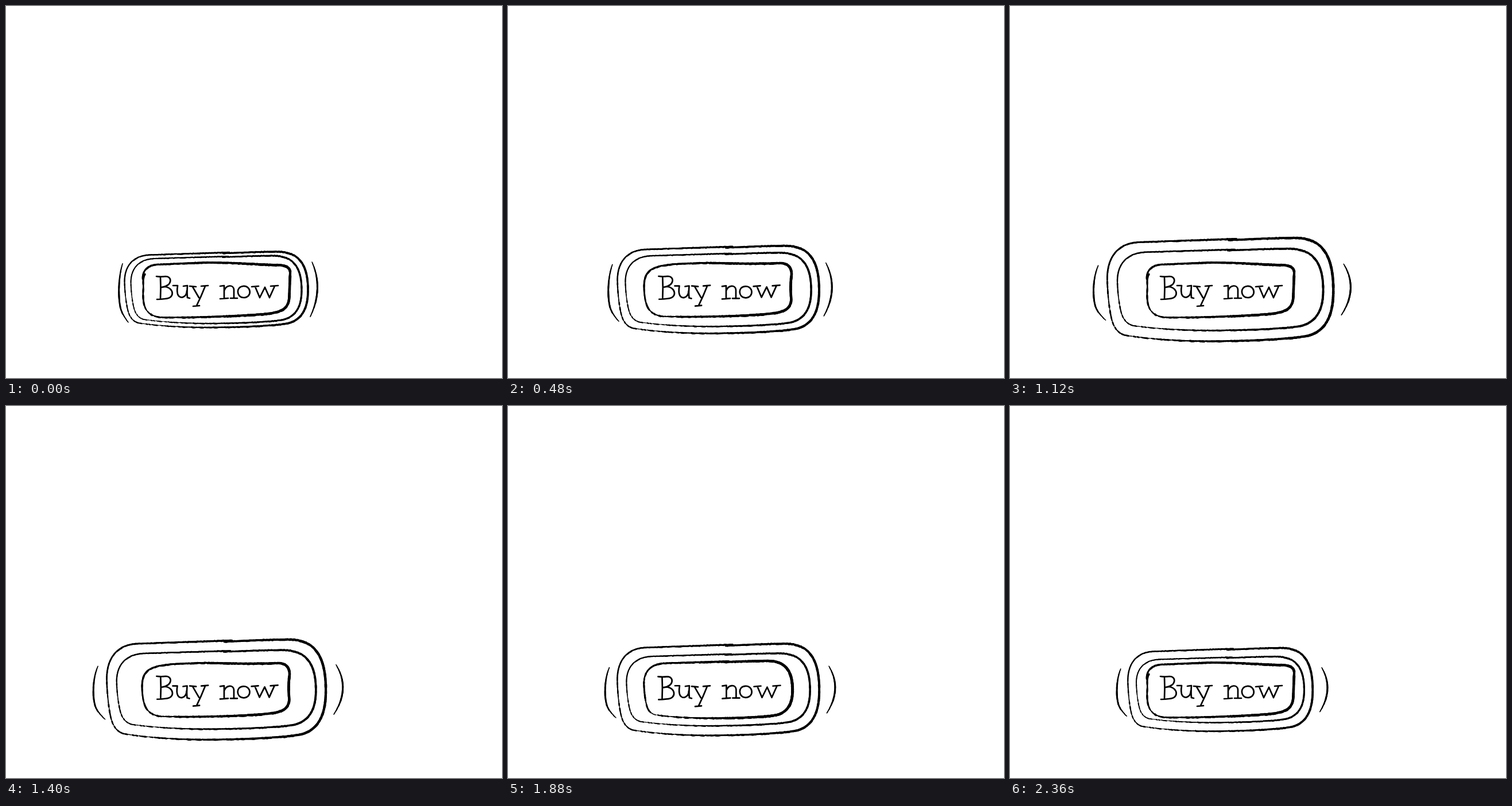
An HTML page with a canvas for the animation above (2400 ms loop, 864x648 px).

```html
<!DOCTYPE html>
<html lang="en">
<head>
<meta charset="utf-8">
<title>Buy now</title>
<style>
  html, body { margin: 0; height: 100%; overflow: hidden; background: #fff; }
  canvas { display: block; }
</style>
</head>
<body>
<canvas id="stage" width="864" height="648" role="img" aria-label="Buy now"></canvas>
<script>
const ctx = document.getElementById('stage').getContext('2d');
const LOOP = 2400, STEP = 40, PEAK = 1160;
const CX = 366, CY = 494, HALF_W = 160, HALF_H = 66;

const noise = n => { const s = Math.sin(n * 127.1) * 43758.5453; return s - Math.floor(s); };
const mix = (a, b, k) => a + (b - a) * k;

// Linear from start to peak, then linear to the end of the loop
const ramp = (t, start, peak, end) => t < PEAK
  ? mix(start, peak, t / PEAK)
  : mix(peak, end, (t - PEAK) / (LOOP - PEAK));

// Evenly spaced points along an SVG path
function sample(d) {
  const path = document.createElementNS('http://www.w3.org/2000/svg', 'path');
  path.setAttribute('d', d);
  const length = path.getTotalLength(), count = Math.ceil(length / 2.5);
  return Array.from({ length: count + 1 }, (_, i) => path.getPointAtLength(length * i / count));
}

const ring = sample('M389 429.3L250 433.5C222 435 206.5 452 206.5 480C207 505 211 530 215 538Q220 549 231 552' +
  'C260 557 310 560 350 560C410 560 470 557 490 553C520 546 526 520 526 495C526 455 514 428 472 428Q430 428.5 378 431');
const openBox = sample('M242 467C237 475 240 485 239 496C238 520 241 541 272 542.5C330 543 390 541 440 537.5' +
  'C480 535 493 529 493.5 505L495 466Q496 452 476 451.5C430 450 400 447 345 447L262 450.5Q238 453 238 476');
const smoothBox = sample('M446 448.5C400 450 360 446 320 448.5C250 450 237 458 237 490C238 525 246 540 275 541' +
  'C330 542 390 541 440 537.5C480 535 492 530 493.5 511Q491 490 494 468Q494 449 476 448L444 449');
const arcs = [
  sample('M203 449C195 474 195 516 201 531Q205 541 213 551'),
  sample('M533 446C546 475 546 508 530 541')
];
const letters = [
  'M262 471Q270 472 278 471C290 471 290 488 271 490M276 489C293 490 295 510 277 510Q270 511 263 511M269 472Q270 491 269 510',
  'M291 487L299 487Q297 499 300 504C304 511 315 507 315 496M309 488L316 487Q315 499 316 508L320 509',
  'M320 488L331 489M325 489L336 508M340 488L352 487M347 488Q340 506 332 522M326 523L337 522',
  'M373 488L380 487L380 509M373 510L387 509M380 496C384 485 396 485 397 494L397 509M391 509L403 509',
  'M414 488C400 488 401 508 414 508C429 508 428 487 413 488',
  'M428 489L440 488M434 489L442 508L451 490L459 508L468 488M461 488L474 487'
].map(d => new Path2D(d));

// Uneven ink line: heavier to the right, drier to the lower left
function brush(points, { cx = CX, cy = CY, sx = 1, sy = 1, weight = 3, lean = .25, taper = false, seed = 1 }) {
  let last;
  points.forEach((p, i) => {
    const u = (p.x - CX) / HALF_W, v = (p.y - CY) / HALF_H, r = noise(seed * 1000 + i);
    const dry = taper ? 0 : Math.max(0, v - u) / 2;
    const ends = taper ? .45 + .55 * Math.sin(Math.PI * i / points.length) : 1;
    const next = [cx + (p.x - cx) * sx, cy + (p.y - cy) * sy + (r - .5) * .6];
    if (last) {
      ctx.lineWidth = Math.max(.5, weight * ends * (1 + lean * u + (r - .5) * (.25 + .8 * dry * dry) - .6 * dry ** 3));
      ctx.beginPath();
      ctx.moveTo(...last);
      ctx.lineTo(...next);
      ctx.stroke();
    }
    last = next;
  });
}

function drawBox(look) {
  if (look === 2) brush(ring, { sx: .81, sy: .757, weight: 3.8, seed: 7 });
  else brush(look ? smoothBox : openBox, { weight: 3.8, seed: 5 + look });
}

function drawText(look) {
  ctx.lineWidth = 2.7;
  letters.forEach((letter, i) => {
    const shift = k => look ? (noise(look * 20 + i * 3 + k) - .5) * 1.2 : 0;
    ctx.save();
    ctx.translate(shift(0), shift(1));
    ctx.stroke(letter);
    ctx.restore();
  });
}

function draw(now) {
  const frame = Math.floor(now % LOOP / STEP), t = frame * STEP;
  const look = [0, 1, 1, 2, 0][Math.floor(frame / 2) % 5];
  ctx.fillStyle = '#fff';
  ctx.fillRect(0, 0, 864, 648);
  ctx.strokeStyle = '#000';
  ctx.lineCap = ctx.lineJoin = 'round';

  const outer = ramp(t, 1, 1.241, 1), inner = ramp(t, .931, 1.129, .908);
  brush(ring, { sx: outer, sy: ramp(t, 1, 1.377, 1.09), weight: 2.9 * outer });
  brush(ring, { sx: inner, sy: ramp(t, .894, 1.086, .864), weight: 2.7 * inner });

  const spread = { cx: 370, cy: 496, sx: ramp(t, 1, 1.306, 1.053), sy: ramp(t, 1, .93, .803) };
  arcs.forEach((arc, i) => brush(arc, { ...spread, weight: 3.1, lean: 0, taper: true, seed: 3 + i }));

  drawBox(look);
  drawText(look);
  requestAnimationFrame(draw);
}
requestAnimationFrame(draw);
</script>
</body>
</html>
```
